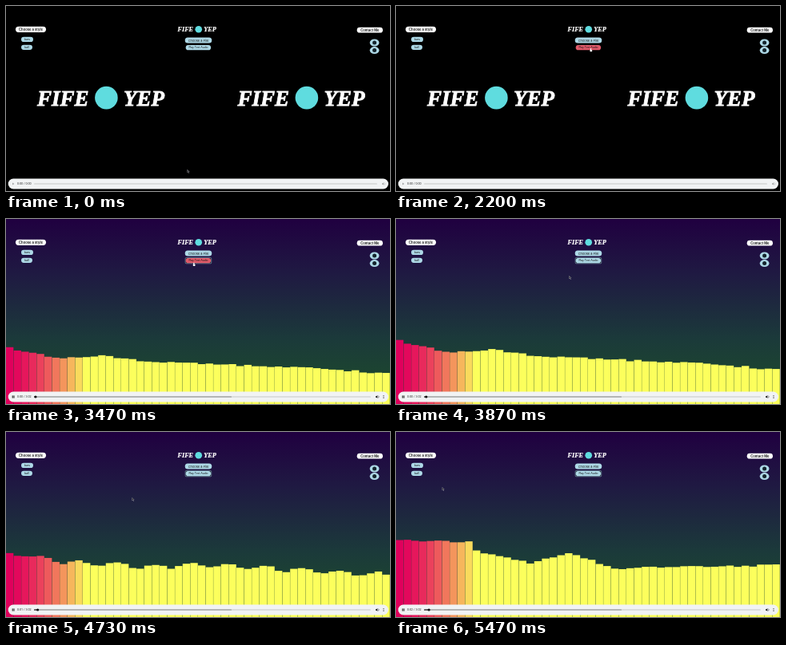
An HTML page with a canvas for the animation above (5.54 s loop, 480 by 232 pixels).

```html
<!DOCTYPE html>
<html lang="en">
<head>
<meta charset="utf-8">
<title>Music visualizer</title>
<style>
html, body { margin: 0; width: 100%; height: 100%; overflow: hidden; background: #000; }
canvas { display: block; width: 480px; height: 232px; }
</style>
</head>
<body>
<canvas id="stage"></canvas>
<script>
const W = 480, H = 232, LOOP = 5540, FPS = 15, BARS = 50;
const HOVER = 1930, CLICK = 2670, PLAY = 3000, LOADED = 3190, LEAVE = 3560;
const SANS = 'Inter, Roboto, sans-serif';
const BLUE = [173, 216, 230], RED = [224, 90, 106];
const CYAN = '#5fdcdf', INK = '#14242c', DARK = '#111', DIM = '#a5a7a8';

const canvas = document.getElementById('stage');
const g = canvas.getContext('2d');
const dpr = window.devicePixelRatio || 1;
canvas.width = W * dpr;
canvas.height = H * dpr;

const clamp = v => Math.max(0, Math.min(1, v));
const mix = (a, b, u) => a + (b - a) * u;
const ease = u => u * u * (3 - 2 * u);
const rgb = c => `rgb(${c.map(Math.round).join()})`;

function noise(i, k) {
  const v = Math.sin(i * 12.99 + k * 78.23) * 43758.55;
  return (v - Math.floor(v)) * 2 - 1;
}

// Interpolates a polyline of [key, ...values] and returns the values at a key
function along(points, key) {
  let k = 1;
  while (k < points.length - 1 && key > points[k][0]) k++;
  const a = points[k - 1], b = points[k];
  const u = clamp((key - a[0]) / (b[0] - a[0]));
  return a.slice(1).map((v, i) => mix(v, b[i + 1], u));
}

// Pointer: time, x, y
const path = [
  [70, 226.5, 204.8], [270, 227, 165], [530, 227, 165], [1070, 228, 81.5],
  [1670, 234, 68], [2200, 243.5, 54], [2400, 241, 54], [3000, 241, 54],
  [3530, 234, 56], [3867, 216.3, 71], [4400, 193.6, 79], [5067, 121.3, 84.8], [5467, 57.6, 69]
];

// Spectrum outlines: bar index, top
const poses = [
  { t: 3867, line: [[0, 153], [6, 167], [12, 164], [19, 173], [40, 181], [50, 190]] },
  { t: 4400, line: [[0, 147], [2, 142], [5, 153], [16, 160], [22, 157], [50, 175]] },
  { t: 5067, line: [[0, 161], [10, 175], [15, 173], [18, 180], [26, 174], [50, 185]] },
  { t: 5467, line: [[0, 136], [9, 138], [10, 149], [17, 165], [22, 152], [28, 171], [50, 167]] }
];

function pill(x, y, w, h, fill) {
  g.fillStyle = fill;
  g.beginPath();
  g.roundRect(x, y, w, h, h / 2);
  g.fill();
}

function disc(x, y, rx, ry, fill) {
  g.fillStyle = fill;
  g.beginPath();
  g.ellipse(x, y, rx, ry, 0, 0, 7);
  g.fill();
}

function polygon(...points) {
  g.beginPath();
  for (const [x, y] of points) g.lineTo(x, y);
  g.closePath();
  g.fill();
}

function text(s, x, y, font, fill, align = 'center') {
  g.font = font;
  g.fillStyle = fill;
  g.textAlign = align;
  g.fillText(s, x, y);
}

function button(label, x, y, w, h, fill, size, weight = 400) {
  pill(x, y, w, h, fill);
  text(label, x + w / 2, y + h / 2 + size * 0.36, `${weight} ${size}px ${SANS}`, DARK);
}

function logo(x, y, size) {
  const font = `italic bold ${size}px "Liberation Serif", "Times New Roman", serif`;
  g.strokeStyle = '#fff';
  g.lineWidth = size * 0.03;
  for (const [word, dx] of [['FIFE', 0], ['YEP', 4]]) {
    text(word, x + size * dx, y, font, '#fff', 'left');
    g.strokeText(word, x + size * dx, y);
  }
  const r = size * 0.53;
  disc(x + size * 3.2, y - size * 0.36, r, r, CYAN);
}

function background() {
  const grad = g.createLinearGradient(0, 0, 0, H);
  grad.addColorStop(0, '#200040');
  grad.addColorStop(0.3, '#1f1a42');
  grad.addColorStop(0.65, '#1b3a3a');
  grad.addColorStop(1, '#1d4d28');
  g.fillStyle = grad;
  g.fillRect(0, 0, W, H);
}

function barTop(i, t) {
  const top = k => along(poses[k].line, i)[0] + noise(i, k) * 1.3;
  const rise = 1 - (1 - clamp((t - 3260) / 400)) ** 3;
  let k = 0;
  while (k < poses.length - 2 && t > poses[k + 1].t) k++;
  const t0 = poses[k].t, t1 = poses[k + 1].t;
  const u = clamp((t - t0) / (t1 - t0));
  const wobble = Math.sin(i * 1.3 + t / 85) * 3 * Math.sin(Math.PI * u);
  return mix(H, mix(top(k), top(k + 1), ease(u)) + wobble, rise);
}

function bars(t) {
  const step = W / BARS;
  for (let i = 0; i < BARS; i++) {
    const u = Math.min(1, i / 10);
    const y = barTop(i, t);
    g.fillStyle = rgb([224 + 28 * u, 255 * u ** 1.5, 92]);
    g.fillRect(i * step, y, step - 0.25, H - y);
  }
}

function speaker(x, y, fill) {
  g.fillStyle = g.strokeStyle = fill;
  g.fillRect(x - 2, y - 0.7, 1.2, 1.4);
  polygon([x - 1.4, y], [x + 0.3, y - 1.9], [x + 0.3, y + 1.9]);
  g.lineWidth = 0.5;
  g.beginPath();
  g.arc(x + 0.3, y, 1.7, -1, 1);
  g.stroke();
}

function player(t) {
  const y = 223, left = 35, playing = t >= PLAY, loaded = t >= LOADED;
  const track = (right, fill) => pill(left, y - 0.6, right - left, 1.2, fill);
  pill(2.7, 216.5, 475.3, 13, '#f1f3f4');
  if (playing) {
    g.fillStyle = DARK;
    for (const x of [7.7, 9.5]) g.fillRect(x, y - 1.6, 1, 3.2);
  } else {
    g.fillStyle = DIM;
    polygon([8, y - 1.6], [10.5, y], [8, y + 1.6]);
  }
  const sec = Math.max(0, t - 3300) / 1000;
  const time = `0:0${Math.floor(sec)} / ${loaded ? '3:02' : '0:00'}`;
  text(time, 14, y + 1.3, '3.7px Roboto, sans-serif', '#333', 'left');
  track(loaded ? 456 : 464, '#c5c7c8');
  if (loaded) track(282, '#8b8d8e');
  if (playing) {
    const x = 36.6 + sec * 2.1;
    track(x, DARK);
    disc(x, y, 1.6, 1.6, DARK);
  }
  speaker(loaded ? 464 : 472, y, loaded ? DARK : DIM);
  if (loaded) for (const d of [-1.6, 0, 1.6]) disc(472, y + d, 0.5, 0.5, DARK);
}

function pointer(t, hand) {
  const [x, y] = along(path, t);
  g.save();
  g.translate(x, y);
  if (hand) {
    pill(-0.6, -1, 1.2, 3.5, '#fff');
    pill(-1.2, 0.9, 3, 2.4, '#fff');
  } else {
    g.fillStyle = '#8c8c94';
    polygon([0, 0], [0, 4.3], [1, 3.5], [1.8, 5], [2.5, 4.7], [1.8, 3.1], [3, 3]);
    g.fillStyle = DARK;
    polygon([0.5, 1.2], [0.5, 3.3], [1.9, 2.6]);
  }
  g.restore();
}

function controls(t) {
  const blue = rgb(BLUE);
  button('Choose a style', 12, 25.7, 38, 7.2, '#fff', 4.2, 600);
  button('bars', 19, 38.8, 15, 6.2, blue, 3.4);
  button('ball', 19, 48.7, 14, 6.2, blue, 3.4);
  button('Contact Me', 438.7, 26.8, 32.3, 6.8, '#fff', 4.2, 600);
  for (const y of [46, 55.6]) {
    disc(460.6, y, 5.9, 4.5, blue);
    disc(460.6, y, 2.5, 2.5, INK);
  }
  button('Choose a File', 223.7, 39.6, 33.6, 7, blue, 4);

  const heat = clamp((t - HOVER) / 250) * (1 - clamp((t - LEAVE) / 200));
  const fill = rgb(BLUE.map((c, i) => mix(c, RED[i], heat)));
  if (t >= CLICK) {
    g.fillStyle = '#10101c';
    g.strokeStyle = '#93bccf';
    g.lineWidth = 0.6;
    g.beginPath();
    g.roundRect(224.2, 48.6, 32.5, 7.2, 1);
    g.fill();
    g.stroke();
  }
  button('Play Test Audio', 224.7, 49.1, 31.4, 6.2, fill, 3.3);
}

function draw(t) {
  g.setTransform(dpr, 0, 0, dpr, 0, 0);
  g.fillStyle = '#000';
  g.fillRect(0, 0, W, H);
  if (t >= PLAY) {
    background();
    bars(t);
  } else {
    for (const x of [39, 289.5]) logo(x, 124.8, 27);
  }
  logo(214.5, 32.2, 8.2);
  controls(t);
  player(t);
  pointer(t, t >= HOVER && t < LEAVE);
}

const start = performance.now();
function tick() {
  const t = (performance.now() - start) % LOOP;
  draw(Math.floor((t + 3) * FPS / 1000) * 1000 / FPS);
  requestAnimationFrame(tick);
}
tick();
</script>
</body>
</html>
```
